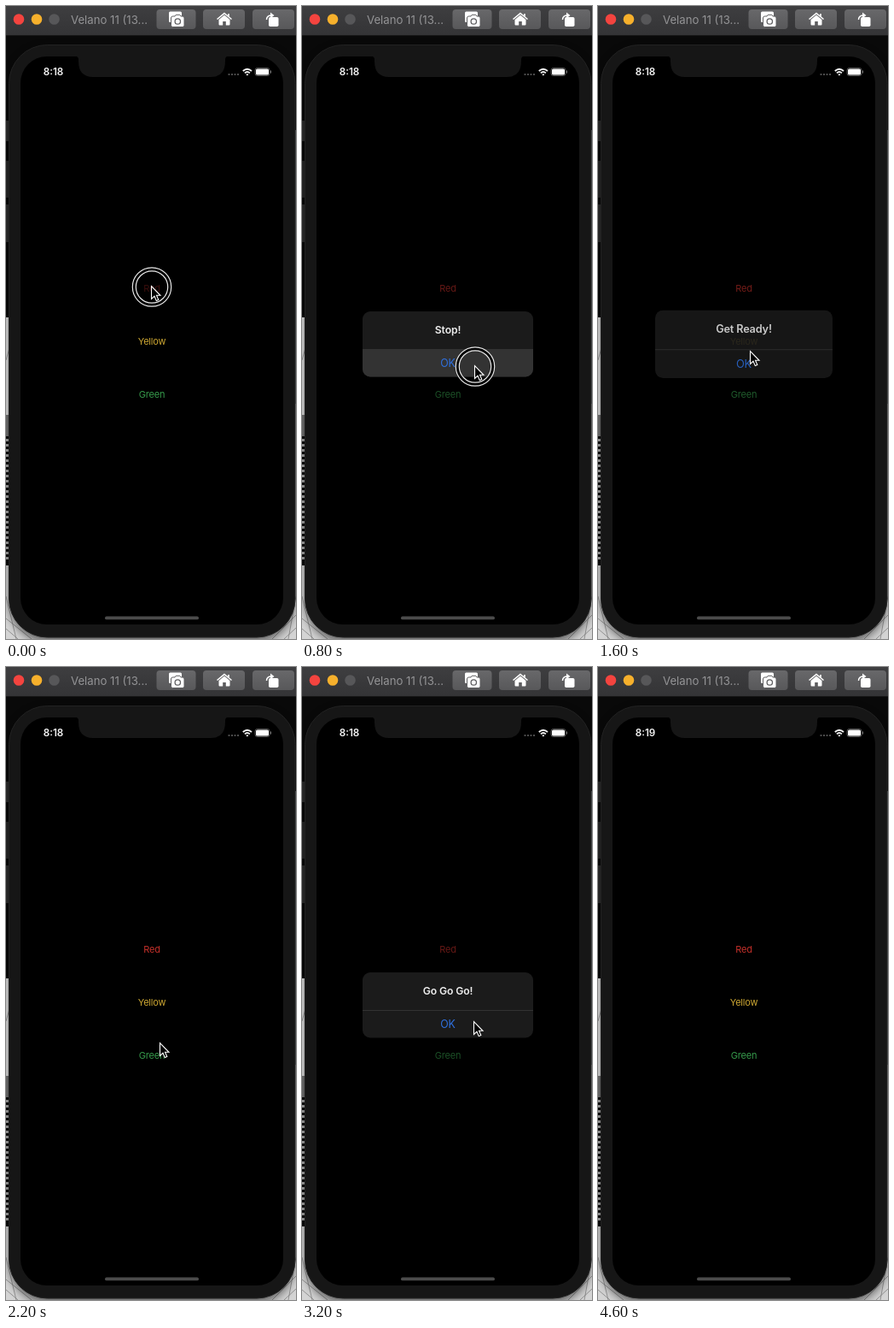
These frames come from a looping animation (340 px wide and 740 px high, 4800 ms). An HTML page:

```html
<!DOCTYPE html>
<html lang="en">
<head>
<meta charset="utf-8">
<title>Traffic light alerts</title>
<style>
html, body { margin: 0; width: 100%; height: 100%; overflow: hidden; background: #000; }
svg { display: block; width: 340px; height: 740px; }
text { font-family: Inter, Roboto, sans-serif; text-anchor: middle; }
#labels { font-size: 11px; letter-spacing: -.2px; }
.bold { font-weight: 600; }
</style>
</head>
<body>
<svg viewBox="0 0 340 740">
  <defs>
    <linearGradient id="bar" x2="0" y2="1"><stop stop-color="#3e3e40"/><stop offset="1" stop-color="#343436"/></linearGradient>
    <linearGradient id="key" x2="0" y2="1"><stop stop-color="#68686a"/><stop offset="1" stop-color="#58585a"/></linearGradient>
    <clipPath id="card"><rect x="71" y="357" width="200" height="76.5" rx="9"/></clipPath>
    <filter id="blur" x="-10%" width="120%"><feGaussianBlur stdDeviation="6"/></filter>
  </defs>

  <!-- desktop showing around the device -->
  <rect width="340" height="740" fill="#090909"/>
  <g id="desk"></g>
  <path d="M0 716L30 740M0 728L14 740M0 690L12 740M340 712L312 740M340 727L326 740M340 690L331 740M0 414L4 400" stroke="#777" stroke-width=".7"/>
  <rect x="4" y="50" width="334" height="693" rx="46" opacity=".6" filter="url(#blur)"/>

  <!-- window bar -->
  <rect width="340" height="34" fill="url(#bar)"/>
  <path d="M0 34.5H340" stroke="#161616"/>
  <circle cx="15" cy="15.5" r="6.3" fill="#f4443f"/>
  <circle cx="36" cy="15.5" r="6.3" fill="#f6b02c"/>
  <circle cx="56.5" cy="15.5" r="6.3" fill="#575759"/>
  <text x="76" y="20.5" font-size="13.2" fill="#949496" style="text-anchor:start">Velano 11 (13...</text>
  <g fill="url(#key)">
    <rect x="176.5" y="4" width="46" height="23" rx="4"/>
    <rect x="231" y="4" width="49" height="23" rx="4"/>
    <rect x="289" y="4" width="49" height="23" rx="4"/>
  </g>
  <g fill="#fff">
    <rect x="191" y="6.5" width="15" height="12.5" rx="1.5"/>
    <path d="M193.500 14q0-2 2-2h2.500l1.200-1.700h4.600L205 12h2q2 0 2 2v8.500q0 2-2 2h-11.500q-2 0-2-2z" stroke="#5f5f61"/>
    <circle cx="201.300" cy="18" r="3.200" fill="none" stroke="#5f5f61" stroke-width="1.300"/>
    <path d="M249.500 16v5.500q0 1 1 1h3.700v-4.500h3.600v4.500h3.700q1 0 1-1V16l-6.500-5.500z"/>
    <path d="M247.500 15.500L256 8.500l8.500 7M261 9v4" fill="none" stroke="#fff" stroke-width="1.600"/>
    <rect x="308" y="13" width="11.5" height="11" rx="1.800"/>
    <path d="M305.500 16q0-5 6-5" fill="none" stroke="#fff" stroke-width="1.500"/>
    <path d="M310 7.500l4.500 3.500-4.500 3.500z"/>
  </g>

  <!-- device -->
  <rect x="3.5" y="45.5" width="335.5" height="692.5" rx="45" fill="#161616" stroke="#222"/>
  <rect x="17" y="59" width="308" height="664" rx="31" fill="#000"/>
  <path d="M80 58.500q5 0 5 4v2q0 18.500 17 18.500h138q17 0 17-18.500v-2q0-4 5-4z" fill="#161616"/>
  <text id="clock" class="bold" x="55.5" y="81" font-size="11.7" fill="#f2f2f2"></text>
  <path d="M260.500 80H273" stroke="#4c4c4c" stroke-width="2" stroke-dasharray="2 1.5"/>
  <path d="M277.800 76q5-4.600 10.200 0M279.900 78.300q3-2.700 6 0" fill="none" stroke="#f4f4f4" stroke-width="1.800"/>
  <path d="M281.400 80q1.500-1.300 3 0l-1.500 1.600z" fill="#f4f4f4"/>
  <rect x="292" y="72.5" width="17" height="9" rx="2.6" fill="none" stroke="#6c6c6c" stroke-width=".8"/>
  <rect x="293" y="73.5" width="15" height="7" rx="1.6" fill="#fff"/>
  <path d="M310.500 75.500v3" stroke="#777"/>
  <rect x="116" y="713.5" width="110" height="3.8" rx="1.9" fill="#4b4b4b"/>

  <g id="labels">
    <text x="171" y="333.5" fill="#c5302a">Red</text>
    <text x="171" y="395.5" fill="#cca632">Yellow</text>
    <text x="171" y="457.5" fill="#369a4b">Green</text>
  </g>

  <g id="alert">
    <g clip-path="url(#card)">
      <rect x="71" y="357" width="200" height="77" fill="#1b1b1b"/>
      <rect id="row" x="71" y="401" width="200" height="33" fill="#333"/>
      <path d="M71 401.500H271" stroke="#333"/>
    </g>
    <text id="title" class="bold" x="171" y="382.7" font-size="12.2" letter-spacing="-.15" fill="#ededed"></text>
    <text x="171" y="422" font-size="12.4" letter-spacing="-.2" fill="#2f70de">OK</text>
  </g>

  <g id="cursor">
    <g id="ring" fill="none">
      <circle cx="1" cy="1.5" r="20.7" stroke="#000" stroke-width="4.5"/>
      <circle cx="1" cy="1.5" r="22.7" stroke="#e8e8e8" stroke-width="1.2"/>
      <circle cx="1" cy="1.5" r="18.7" stroke="#e8e8e8" stroke-width="1.2"/>
    </g>
    <path d="M.5.500V15.500L4 12.300 6.300 17.600 8.800 16.500 6.500 11.300H11z" fill="#000" stroke="#fff" stroke-width="1.1"/>
  </g>
</svg>
<script>
const $ = id => document.getElementById(id);
const STEP = 200, STEPS = 24;

// desktop strips: x, y, height, colour, width
const strips = [
  [0, 134, 24, '#303030'], [0, 181, 43, '#2a2a2a'], [0, 232, 44, '#303030'],
  [0, 364, 114, '#e4e4e4'], [0, 478, 25, '#777'], [0, 654, 86, '#d4d4d4'],
  [320, 145, 320, '#83868a'], [320, 465, 275, '#c4c4c4'], [0, 690, 50, '#d4d4d4', 340]
];
for (let y = 506; y < 650; y += 6) strips.push([0, y, 3, '#aaa']);
$('desk').innerHTML = strips.map(([x, y, h, c, w = 20]) =>
  `<rect x="${x}" y="${y}" width="${w}" height="${h}" fill="${c}"/>`).join('');

// pointer stops: step, x, y (no position hides it)
const stops = [
  [0, 170, 327], [2, 184, 366], [3, 202, 420], [6, 182, 392], [7, 177, 396],
  [8, 178, 403], [9, 180, 418], [11, 180, 439], [12, 180, 453],
  [15, 201, 414], [21]
];
const presses = [0, 4, 7, 9, 12, 18];

// each alert: title, first step, step of the OK press
const alerts = [['Stop!', 1, 4], ['Get Ready!', 8, 9], ['Go Go Go!', 13, 18]];
const labels = [...$('labels').children];

function draw(now) {
  const n = Math.floor(now / STEP) % STEPS;
  const [, x, y] = stops.findLast(s => s[0] <= n);
  const pressed = presses.includes(n);
  const open = alerts.find(([, from, ok]) => n >= from && n <= ok + 1);
  let shown = 0, scale = 1;
  if (open) {
    const [title, from, ok] = open;
    shown = n === from ? .85 : n > ok ? .18 : 1;
    if (n === from) scale = 1.04;
    $('title').textContent = title;
  }
  $('alert').setAttribute('opacity', shown);
  $('alert').setAttribute('transform', `translate(171 395) scale(${scale}) translate(-171 -395)`);
  $('row').setAttribute('visibility', open && pressed ? 'visible' : 'hidden');

  labels.forEach((label, i) => {
    const touched = n === alerts[i][1] - 1;
    label.setAttribute('opacity', touched ? .3 : 1 - .48 * shown);
  });

  $('cursor').setAttribute('visibility', x ? 'visible' : 'hidden');
  if (x) $('cursor').setAttribute('transform', `translate(${x} ${y})`);
  $('ring').setAttribute('opacity', pressed ? 1 : 0);
  $('clock').textContent = n < STEPS - 1 ? '8:18' : '8:19';
}

const start = performance.now();
function tick() {
  draw(performance.now() - start);
  requestAnimationFrame(tick);
}
tick();
</script>
</body>
</html>
```
